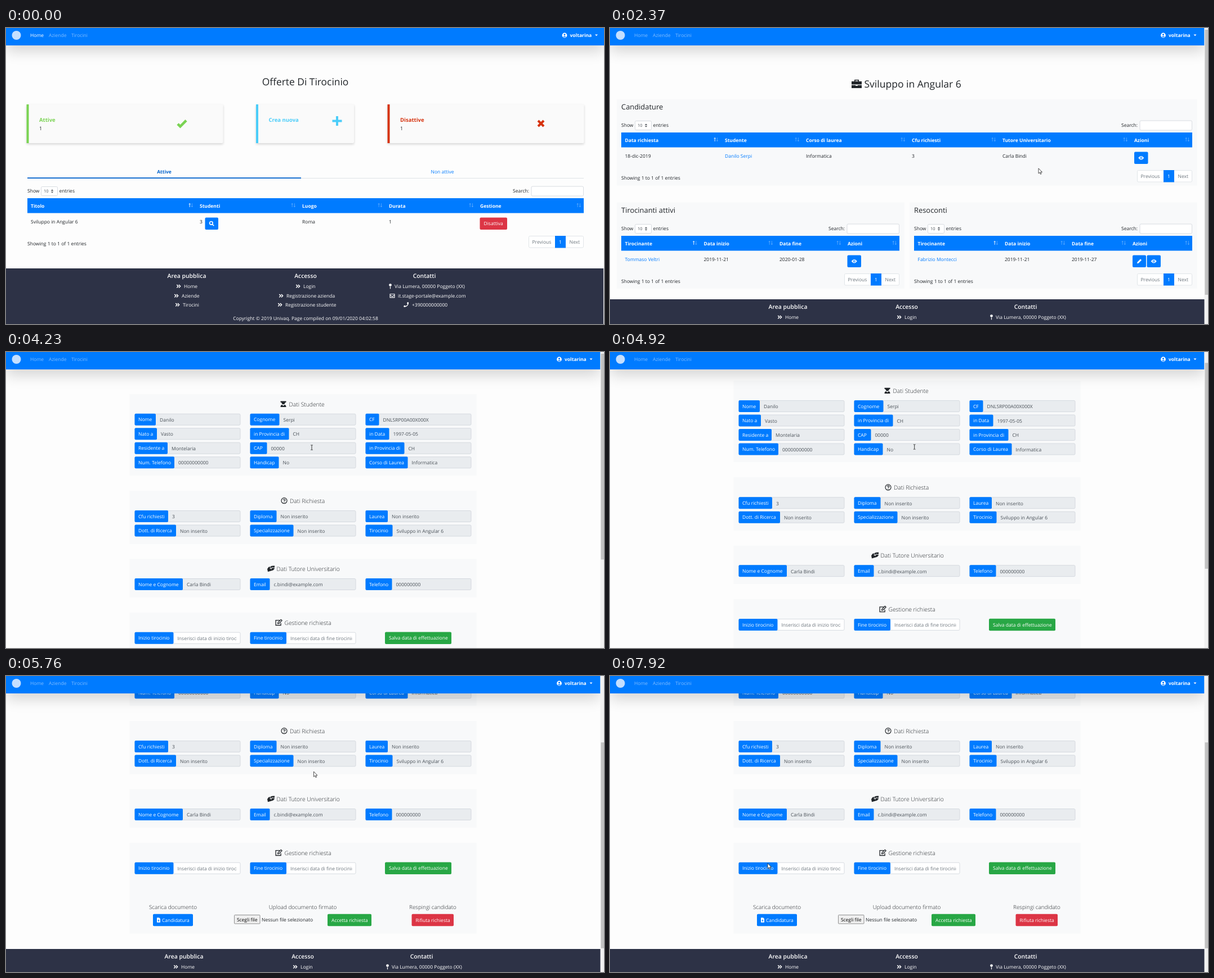
These frames come from a looping animation (1062x527 px, 7.99 s). An HTML page:

```html
<!DOCTYPE html>
<html lang="it">
<head>
<meta charset="utf-8">
<title>Offerte Di Tirocinio</title>
<style>
html, body { margin: 0; width: 100%; height: 100%; overflow: hidden; background: #fdfdfd; }
#stage { display: block; width: 100vw; height: 100vh; }
text { font-family: 'Open Sans', 'Noto Sans', sans-serif; text-rendering: geometricPrecision; white-space: pre; }
.row { fill: none; } .row.on { fill: #ebebeb; }
.blue { fill: #007bff; } .blue.on { fill: #0065d0; }
.green { fill: #28a745; } .green.on { fill: #218838; }
.red { fill: #dc3545; } .red.on { fill: #c82333; }
.link { fill: #007bff; } .link.on { fill: #0056b3; text-decoration: underline; }
</style>
</head>
<body>
<svg id="stage" viewBox="0 0 1062 527"></svg>
<script>
const BLUE = '#007bff', INK = '#212529', GREY = '#495057', MUTED = '#6c757d', LINE = '#ced4da';

// icon: [path, stroke width]; width 0 means filled
const ICONS = {
  check: ['M-7.5 .8L-3 5.3L7.5-5.3', 4.6],
  plus: ['M-8.5 0H8.5M0-8.5V8.5', 4],
  times: ['M-5-5L5 5M5-5L-5 5', 4],
  search: ['M-3.7-.9a2.8 2.8 0 1 0 5.6 0a2.8 2.8 0 1 0-5.6 0M1.2 1.2L4 4', 1.6],
  chevrons: ['M-3.2-2.7L-.5 0L-3.2 2.7M.4-2.7L3.1 0L.4 2.7', 1.5],
  pin: ['M-2.4-2.2a2.4 2.4 0 1 0 4.8 0a2.4 2.4 0 1 0-4.8 0M-.6 .6H.6V4.2L0 5L-.6 4.2Z', 0],
  envelope: ['M-4-3.1H4V3.1H-4ZM-4-1.3L0 1.4L4-1.3', 1.1],
  phone: ['M4.1-4.3L2-4.8L.9-2.5L2.2-1.4C1.5 .3 .2 1.6-1.4 2.2L-2.5 .9L-4.8 2L-4.3 4.1C.5 4.3 4.3 .5 4.1-4.3Z', 0],
  briefcase: ['M-4-4.5V-7.5H4V-4.5H9V1H-9V-4.5ZM-2.3-4.5H2.3V-6H-2.3ZM-9 2.2H-1.8V3.6H1.8V2.2H9V7.5H-9Z', 0],
  eye: ['M-5 0Q0-6.6 5 0Q0 6.6-5 0ZM-2.1 0a2.1 2.1 0 1 0 4.2 0a2.1 2.1 0 1 0-4.2 0M-1 0a1 1 0 1 0 2 0a1 1 0 1 0-2 0', 0],
  pencil: ['M-4 4L-3.4 1.4L2-4L4-2L-1.4 3.4Z', 0],
  graduate: ['M-5-5H5V-3L3-2.3A3 3 0 0 1-3-2.3L-5-3ZM-5 5.4Q-5 1.4-2 1.4L0 3.4L2 1.4Q5 1.4 5 5.4Z', 0],
  question: ['M-5 0a5 5 0 1 0 10 0a5 5 0 1 0-10 0M-1.7-1.2Q-1.6-2.7 0-2.7Q1.8-2.7 1.8-1.2Q1.8-.3 0 .4V1M0 2.2V3.3', 1.2],
  hands: ['M-6.5 .5L-4-3L-1.5-3.4L-1.8 0L1 1L2-1.4L6.3-1L6.5 0L4 2.8L-2 4.6L-5.5 5.5ZM-.8-4L2-5L6.5-5.3V-2L1.4-2.4L.4-.4L-.9-.8Z', 0],
  edit: ['M1.5-3.8H-5.4V5H3.6V1M-2 2.1L-1.5 0L3.8-5.2L5.6-3.4L.3 1.8Z', 1.3],
  file: ['M-3-4.2H1L3-2.2V4.2H-3ZM-.6-1V.8H-1.8L0 2.8L1.8 .8H.6V-1Z', 0],
  user: ['M-4.4 0a4.4 4.4 0 1 0 8.8 0a4.4 4.4 0 1 0-8.8 0M-1.6-1.2a1.6 1.6 0 1 0 3.2 0a1.6 1.6 0 1 0-3.2 0M-2.7 2.4Q0 .4 2.7 2.4Q0 4.6-2.7 2.4', 0],
  up: ['M0 3.4V-3M-1.5-1.4L0-3L1.5-1.4', .9],
  down: ['M0-3.4V3M-1.5 1.4L0 3L1.5 1.4', .9],
  spin: ['M-2.2-.8L0-3L2.2-.8ZM-2.2 .8L0 3L2.2 .8Z', 0]
};

const hot = [];   // areas that react to the pointer
let page = 0;

const rect = (x, y, w, h, fill, extra = '') =>
  `<rect x="${x}" y="${y}" width="${w}" height="${h}" fill="${fill}" ${extra}/>`;
const box = (x, y, w, h, fill = '#fff', r = 2) =>
  rect(x + .5, y + .5, w - 1, h - 1, fill, `rx="${r}" stroke="${LINE}" stroke-width=".8"`);
const text = (x, y, s, { fill = INK, size = 8.5, weight = 400, anchor = 'start', extra = '' } = {}) =>
  `<text x="${x}" y="${y}" fill="${fill}" font-size="${size}" font-weight="${weight}" text-anchor="${anchor}" ${extra}>${s}</text>`;
const white = (x, y, s, o) => text(x, y, s, { fill: '#fff', ...o });

function icon(name, x, y, color = '#fff', opacity = 1) {
  const [d, w] = ICONS[name];
  const paint = w ? `fill="none" stroke="${color}" stroke-width="${w}"` : `fill="${color}" fill-rule="evenodd"`;
  return `<path transform="translate(${x} ${y})" d="${d}" ${paint} opacity="${opacity}"/>`;
}

function area(x, y, w, h, kind, cursor) {
  hot.push({ page, x, y, w, h, cursor });
  return `id="hot${hot.length - 1}" class="${kind}"`;
}

function button(x, y, w, h, kind, label = '', mark = '') {
  return rect(x, y, w, h, '', 'rx="2" ' + area(x, y, w, h, kind, 'hand')) +
    (mark ? icon(mark, label ? x + 10 : x + w / 2, y + h / 2) : '') +
    (label ? white(x + (mark ? 16 : 7), y + h / 2 + 3.2, label) : '');
}

const link = (x, y, w, s) => text(x, y, s, { extra: area(x, y - 9, w, 12, 'link', 'hand') });

// y is the top of the blue heading row
function table(x, y, right, cols, cells, controls) {
  const w = right - x;
  let s = text(x, y - 10, 'Show') + box(x + 24, y - 21, 30, 17) +
    text(x + 29, y - 9.6, '10', { size: 7.4, fill: GREY }) + icon('spin', x + 44, y - 12.4, '#343a40') +
    text(x + 56.5, y - 10, 'entries') +
    text(right - 97, y - 10, 'Search:', { anchor: 'end' }) + box(right - 93.5, y - 21.5, 93.5, 18) +
    rect(x, y + 26, w, 36, '', area(x, y + 26, w, 36, 'row')) + rect(x, y, w, 26.5, BLUE);
  cols.forEach(([cx, label], i) => {
    const ax = i < cols.length - 1 ? cols[i + 1][0] - 16 : right - 9;
    s += white(cx, y + 16.5, label, { weight: 700 }) +
      icon('up', ax - 1.8, y + 12.5, '#fff', i ? .35 : 1) + icon('down', ax + 2.4, y + 12.5, '#fff', .35);
    if (cells[i]) s += text(cx, y + 45, cells[i]);
  });
  const px = right - 98, py = y + 67;
  return s + controls() + text(x, y + 84, 'Showing 1 to 1 of 1 entries') +
    rect(px + .5, py + .5, 97, 20.5, '#fff', 'rx="2" stroke="#dee2e6" stroke-width=".9"') +
    rect(px + 47, py, 19, 21.5, BLUE) + white(px + 56.5, y + 81, '1', { anchor: 'middle' }) +
    text(px + 6.5, y + 81, 'Previous', { fill: MUTED }) + text(px + 72.5, y + 81, 'Next', { fill: MUTED });
}

function nav(w, dx, active) {
  const dim = 'fill-opacity=".5"';
  return rect(0, 9, w, 31, '#000', 'opacity=".175" filter="url(#deep)"') + rect(0, 0, w, 31, BLUE) +
    '<circle cx="18.5" cy="13" r="8" fill="#c4dfff"/>' +
    white(43, 16.2, 'Home', { extra: active ? '' : dim }) +
    white(76, 16.2, 'Aziende', { extra: dim }) + white(116, 16.2, 'Tirocini', { extra: dim }) +
    icon('user', 992 + dx, 13) + white(1001.5 + dx, 16.2, 'voltarina', { weight: 700 }) +
    `<path d="M${1046 + dx} 11.5h5l-2.5 2.8z" fill="#fff"/>`;
}

function footer(dx, top) {
  const head = (x, s) => white(x, 16.5, s, { size: 10.4, weight: 600, anchor: 'middle' });
  const item = (x, y, s, mark = 'chevrons', gap = 9.5) => icon(mark, x - gap, y - 3.2) + white(x, y, s);
  return `<g transform="translate(${dx} ${top})">` + rect(-10, 0, 1071, 99, '#2d3246') +
    head(321, 'Area pubblica') + head(532, 'Accesso') + head(743, 'Contatti') +
    item(316, 35, 'Home') + item(312, 52, 'Aziende') + item(314, 68, 'Tirocini') +
    item(528, 35, 'Login') + item(498, 52, 'Registrazione azienda') + item(496, 68, 'Registrazione studente') +
    item(690, 35, 'Via Lumera, 00000 Poggeto (XX)', 'pin', 7.5) +
    item(696, 52, 'it.stage-portale@example.com', 'envelope', 10) +
    item(721, 68, '+390000000000', 'phone', 10) +
    white(532, 92, 'Copyright © 2019 Univaq. Page compiled on 09/01/2020 04:02:58', { anchor: 'middle', weight: 500 }) + '</g>';
}

const scrollbar = (id, h) => rect(1055.5, 0, 6.5, 527, '#f1f1f1') + rect(1056.5, 3, 5.5, h, '#c1c1c1', `id="${id}"`);
const status = (id, w, s) => `<g id="${id}">` + rect(-3, 520.5, w + 3, 10, '#15181c', 'rx="2"') +
  text(2, 528.6, s, { size: 6.3, fill: '#6fae4a' }) + '</g>';

function offers() {
  page = 0;
  const card = (x, w, color, label) =>
    rect(x, 138, w, 69, '#000', 'opacity=".16" filter="url(#soft)"') + rect(x, 136, w, 69, '#fafafa', 'rx="2"') +
    rect(x, 136, 4, 69, color) + text(x + 22.5, 166.5, label, { fill: color, size: 9.5, weight: 700 });
  return text(531.5, 101.5, 'Offerte Di Tirocinio', { size: 17.4, weight: 500, anchor: 'middle' }) +
    card(36.5, 349, '#7ad353', 'Attive') + card(444, 174, '#4bcdf9', 'Crea nuova') + card(677.5, 349, '#d6330f', 'Disattive') +
    text(59, 181.5, '1', { size: 9 }) + text(700, 181.5, '1', { size: 9 }) +
    icon('check', 312.5, 170, '#7ad353') + icon('plus', 588, 165.5, '#4bcdf9') + icon('times', 950, 170, '#d6330f') +
    text(281, 259, 'Attive', { fill: '#0062cc', weight: 700, anchor: 'middle' }) +
    text(775, 259, 'Non attive', { fill: BLUE, anchor: 'middle' }) +
    rect(38, 267, 988, 1, '#dee2e6') + rect(38, 266.2, 486, 1.8, '#0062cc') +
    table(38, 303, 1026,
      [[44, 'Titolo'], [344, 'Studenti'], [526, 'Luogo'], [680, 'Durata'], [842, 'Gestione']],
      ['Sviluppo in Angular 6', '3', 'Roma', '1'],
      () => button(353.5, 337.5, 23.5, 21.5, 'blue', '', 'search') + button(841.5, 337.5, 48.5, 21.5, 'red', 'Disattiva')) +
    footer(0, 428) + nav(1062, 0, true) +
    '<g id="tip"><path d="M377 348.5l4-3.5v7z" fill="#111"/>' + rect(380, 340, 80, 17, '#111', 'rx="2"') +
    white(385, 351.6, 'Gestisci Candidature', { size: 7.35 }) + '</g>' +
    status('status0', 170, 'localhost:8084/InternshipTutor/gestione_candidati?at=2');
}

function candidates() {
  page = 1;
  const panel = (x, y, w, h, label) => rect(x, y, w, h, '#f8f9fa') + text(x + 8, y + 18, label, { size: 12.9, weight: 500 });
  const eye = (x, y) => button(x, y, 24.5, 21.5, 'blue', '', 'eye');
  return icon('briefcase', 438, 99.5, INK) + text(451.5, 106, 'Sviluppo in Angular 6', { size: 17.5, weight: 500 }) +
    panel(12, 127, 1030.5, 153.5, 'Candidature') + panel(12, 310.5, 511, 153.5, 'Tirocinanti attivi') +
    panel(532, 310.5, 510.5, 153.5, 'Resoconti') +
    table(20, 186, 1034,
      [[26.5, 'Data richiesta'], [204, 'Studente'], [348, 'Corso di laurea'], [536, 'Cfu richiesti'], [697, 'Tutore Universitario'], [931, 'Azioni']],
      ['18-dic-2019', '', 'Informatica', '3', 'Carla Bindi'],
      () => link(204, 231, 52, 'Danilo Serpi') + eye(931, 220.5)) +
    table(20, 370, 514,
      [[26.5, 'Tirocinante'], [166.5, 'Data inizio'], [301, 'Data fine'], [422, 'Azioni']],
      ['', '2019-11-21', '2020-01-28'],
      () => link(26.5, 415, 55, 'Tommaso Veltri') + eye(421.5, 404.5)) +
    table(540, 370, 1034,
      [[546.5, 'Tirocinante'], [701, 'Data inizio'], [820, 'Data fine'], [928, 'Azioni']],
      ['', '2019-11-21', '2019-11-27'],
      () => link(546.5, 415, 75, 'Fabrizio Montecci') + button(928, 404.5, 24, 21.5, 'blue', '', 'pencil') + eye(953.5, 404.5)) +
    footer(-5, 483) + nav(1055.5, -9.5) + scrollbar('bar1', 472) +
    status('status1', 198, 'localhost:8084/InternshipTutor/gestione_richiesta?studente=4&amp;tirocinio=2');
}

function request() {
  page = 2;
  const panel = (y, h) => rect(219.5, y, 616, h, '#f8f9fa');
  const title = (y, mark, x, s) => icon(mark, x - 10, y - 4.3, INK) + text(x, y, s, { size: 10.3, weight: 300 });
  const sub = (x, s) => text(x, 582.3, s, { size: 9.9, weight: 300, anchor: 'middle' });
  const fields = (y, list, open) => list.map(([label, w, value], i) => {
    const x = 228.5 + 205 * i;
    area(x + w, y, 188 - w, 21, '', 'beam');
    return box(x, y, 188, 21, open ? '#fff' : '#e9ecef') + rect(x, y, w, 21, BLUE, 'rx="2"') +
      white(x + 6.5, y + 13.6, label) +
      `<svg x="${x + w + 7}" y="${y}" width="${174 - w}" height="21">` +
      text(0, 14.3, value, { fill: open ? MUTED : GREY }) + '</svg>';
  }).join('');
  const none = 'Non inserito';
  return '<g id="sheet">' + panel(75, 145) + panel(247, 95) + panel(368.5, 68.5) + panel(464, 161.5) +
    title(96.8, 'graduate', 502.5, 'Dati Studente') +
    fields(109.7, [['Nome', 37.5, 'Danilo'], ['Cognome', 52, 'Serpi'], ['CF', 24, 'DNLSRP00A00X000X']]) +
    fields(135.2, [['Nato a', 39.5, 'Vasto'], ['in Provincia di', 69, 'CH'], ['in Data', 42, '1997-05-05']]) +
    fields(160.7, [['Residente a', 58.5, 'Montelaria'], ['CAP', 30, '00000'], ['in Provincia di', 69, 'CH']]) +
    fields(186.2, [['Num. Telefono', 70.5, '00000000000'], ['Handicap', 51, 'No'], ['Corso di Laurea', 75, 'Informatica']]) +
    title(269, 'question', 504, 'Dati Richiesta') +
    fields(282, [['Cfu richiesti', 59.5, '3'], ['Diploma', 47, none], ['Laurea', 39.5, none]]) +
    fields(307.5, [['Dott. di Ricerca', 73.5, none], ['Specializzazione', 77, none], ['Tirocinio', 48, 'Sviluppo in Angular 6']]) +
    title(390, 'hands', 480.5, 'Dati Tutore Universitario') +
    fields(403, [['Nome e Cognome', 85.5, 'Carla Bindi'], ['Email', 35, 'c.bindi@example.com'], ['Telefono', 47, '000000000']]) +
    title(485.8, 'edit', 494.5, 'Gestione richiesta') +
    fields(498.7, [['Inizio tirocinio', 69, 'Inserisci data di inizio tirocinio'], ['Fine tirocinio', 64.5, 'Inserisci data di fine tirocinio']], true) +
    button(673, 498.5, 118, 21.5, 'green', 'Salva data di effettuazione') +
    sub(296.5, 'Scarica documento') + sub(527, 'Upload documento firmato') + sub(758, 'Respingi candidato') +
    button(261, 590.7, 71, 21.5, 'blue', 'Candidatura', 'file') +
    rect(405.5, 592.5, 45.5, 15.5, '#efefef', 'rx="1" stroke="#767676" stroke-width=".8"') +
    text(428.2, 603.5, 'Scegli file', { fill: '#000', anchor: 'middle' }) + text(454, 603.5, 'Nessun file selezionato') +
    button(571, 590.7, 78, 21.5, 'green', 'Accetta richiesta') + button(720.5, 590.7, 74.5, 21.5, 'red', 'Rifiuta richiesta') +
    footer(-5, 653) + '</g>' + nav(1055.5, -9.5) + scrollbar('bar2', 366.5);
}

const stage = document.getElementById('stage');
const blur = (id, d) => `<filter id="${id}" filterUnits="userSpaceOnUse" x="-80" y="-80" width="1222" height="687"><feGaussianBlur stdDeviation="${d}"/></filter>`;
stage.innerHTML = `<defs>${blur('deep', 13.3)}${blur('soft', 2)}</defs>` +
  [offers, candidates, request].map((draw, i) => `<g id="page${i}">${rect(0, 0, 1062, 527, '#fdfdfd')}${draw()}</g>`).join('') +
  `<g id="pointer" stroke-linejoin="round">
    <path id="arrow" d="M0 0V9.2L2.1 7.3L3.5 10.5L5 9.9L3.6 6.8H6.5Z" fill="#fff" stroke="#222" stroke-width=".8"/>
    <path id="hand" d="M-1 1Q0-.6 1 1V4.4L4.6 5.2Q5.4 5.5 5.3 6.5L4.5 11.6H-.6L-3.2 7.4Q-3-.0-1 7.2Z" fill="#fff" stroke="#222" stroke-width=".8"/>
    <path id="beam" d="M-1.8-4.2H-.5L0-3.8L.5-4.2H1.8M0-3.8V3.8M-1.8 4.2H-.5L0 3.8L.5 4.2H1.8" fill="none" stroke="#222" stroke-width=".9"/>
  </g>`;

const LOOP = 7990, PAGE1 = 1640, PAGE2 = 3660;
const path = [[0, 429, 545], [125, 429, 534], [130, 428, 520], [900, 364.5, 343], [1560, 364.5, 343], [2300, 765, 250],
  [2330, 765, 250], [3140, 229, 227], [3520, 229, 227], [4230, 543, 170], [4340, 543, 170], [4540, 540, 170],
  [4840, 540.5, 169], [5230, 542, 168.8], [5530, 545, 168.8], [5720, 545, 168.8], [6530, 752, 346], [6570, 753, 347],
  [6920, 755, 434], [7150, 625, 434], [7400, 550, 429], [7920, 280, 333.5], [LOOP, 280, 333.5]];
const scrolling = [[0, 0], [4800, 0], [5230, 84.5], [5530, 167], [LOOP, 167]];

function at(keys, t, ease) {
  const i = keys.findIndex(k => k[0] > t), a = keys[i - 1], b = keys[i];
  const p = ease((t - a[0]) / (b[0] - a[0]));
  return a.slice(1).map((v, n) => v + (b[n + 1] - v) * p);
}

const el = id => document.getElementById(id);
const show = (id, on) => el(id).setAttribute('visibility', on ? 'inherit' : 'hidden');
const start = performance.now();

function render() {
  const t = Math.max(0, performance.now() - start) % LOOP;
  const now = t < PAGE1 ? 0 : t < PAGE2 ? 1 : 2;
  const [x, y] = at(path, t, p => p * p * (3 - 2 * p));
  const [scroll] = at(scrolling, t, p => p);
  for (let i = 0; i < 3; i++) show('page' + i, i === now);
  el('sheet').setAttribute('transform', `translate(0 ${-scroll})`);
  el('bar2').setAttribute('y', 3 + scroll * .69);
  show('tip', now === 0 && t >= 980);
  show('status0', now === 0 && t >= 1210);
  show('status1', now === 1 && t >= 3290);

  let cursor = 'arrow';
  hot.forEach((h, i) => {
    const top = h.y - (h.page === 2 ? scroll : 0);
    const on = h.page === now && x >= h.x && x <= h.x + h.w && y >= top && y < top + h.h;
    if (on && h.cursor) cursor = h.cursor;
    const node = el('hot' + i);
    if (node) node.classList.toggle('on', on);
  });
  for (const c of ['arrow', 'hand', 'beam']) show(c, c === cursor);
  el('pointer').setAttribute('transform', `translate(${x} ${y})`);
  requestAnimationFrame(render);
}
render();
</script>
</body>
</html>
```
